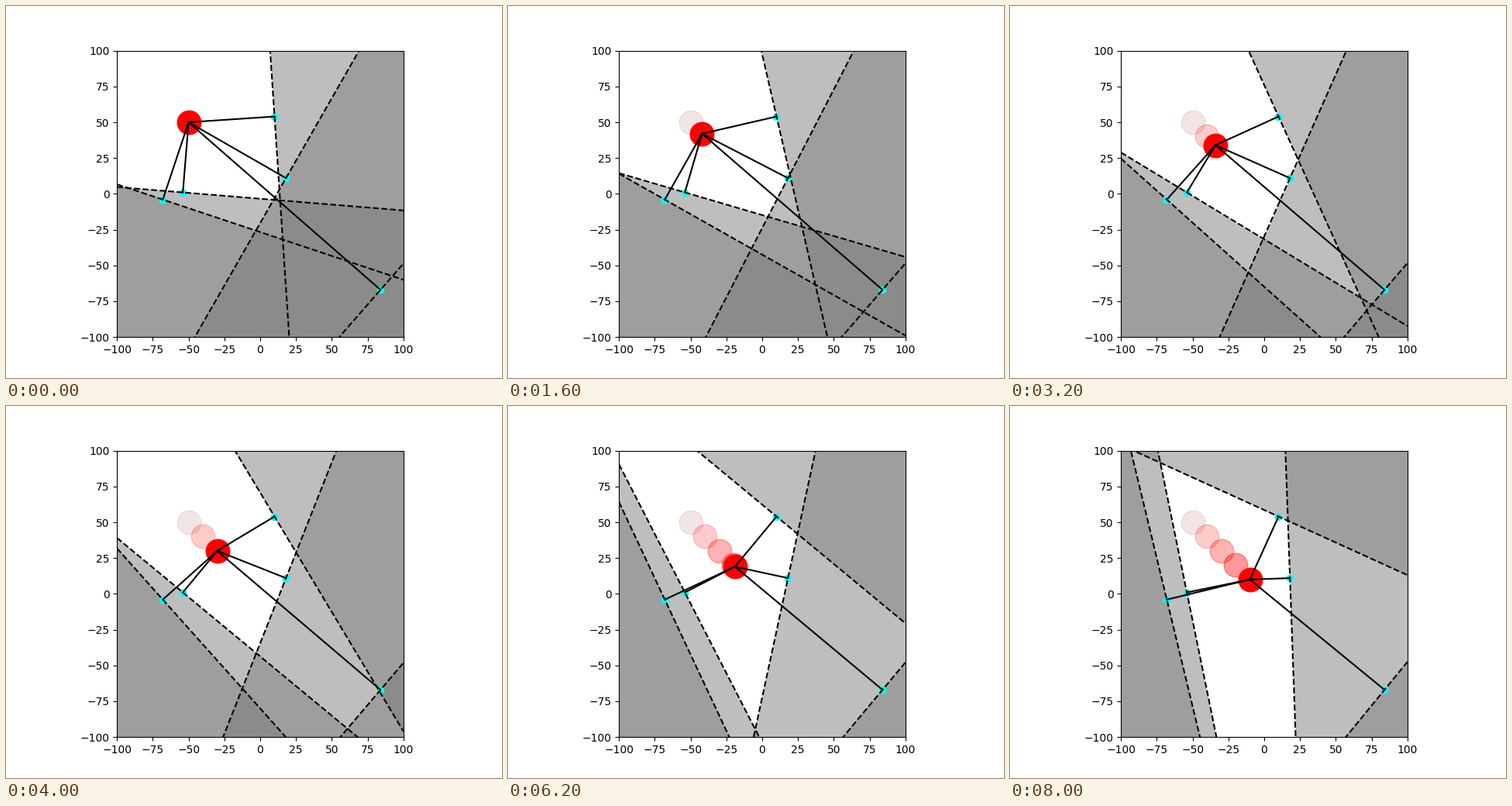
A matplotlib script that plays this animation: 640 by 480 pixels, repeating every 8.2 s.

```python
from itertools import combinations

import matplotlib.pyplot as plt
import numpy as np
from matplotlib.animation import FuncAnimation
from matplotlib.patches import Polygon

FRAMES = 41
INTERVAL = 200
LIMIT = 100
START = np.array([-50.0, 50.0])
STEP = np.array([1.0, -1.0])
POINTS = np.array([(-54, 1), (-68, -4), (10, 54), (18, 11), (84, -67)], float)
SHADES = {1: "#bebebe", 2: "#9e9e9e", 3: "#8b8b8b"}
TRAIL_EVERY = 10
TRAIL_COLORS = [(0.6, 0, 0)] + ["red"] * 3
BODY_SIZE = 22
SQUARE = [np.array(c, float) * LIMIT for c in ((-1, -1), (1, -1), (1, 1), (-1, 1))]


def clip(poly, point, normal):
    """Keep the part of a convex polygon lying beyond point along normal."""
    kept = []
    for a, b in zip(poly, poly[1:] + poly[:1]):
        da, db = (a - point) @ normal, (b - point) @ normal
        if da >= 0:
            kept.append(a)
        if da * db < 0:
            kept.append(a + (b - a) * da / (da - db))
    return kept


def barrier(point, normal):
    """Line through point at right angles to normal, across the x range."""
    slope = -normal[0] / (normal[1] or 1e-3)
    x = np.array([-LIMIT, LIMIT])
    return x, point[1] + slope * (x - point[0])


fig, ax = plt.subplots(figsize=(6.4, 4.8), dpi=100)
ax.set_aspect("equal")
ax.set_xlim(-LIMIT, LIMIT)
ax.set_ylim(-LIMIT, LIMIT)

# Overlaps of one, two and three half-planes, darker with each level
shadows = []
for depth, shade in SHADES.items():
    for combo in combinations(range(len(POINTS)), depth):
        patch = Polygon(np.zeros((3, 2)), facecolor=shade, linewidth=0)
        shadows.append((combo, ax.add_patch(patch)))

trail = []
for i, color in enumerate(TRAIL_COLORS):
    x, y = START + STEP * TRAIL_EVERY * i
    trail += ax.plot(x, y, "o", color=color, ms=BODY_SIZE, alpha=0.1 * (i + 1))

body, = ax.plot([], [], "o", color="red", ms=BODY_SIZE)
ax.plot(*POINTS.T, "o", color="cyan", ms=6)
rays = [ax.plot([], [], "k-", lw=1.5)[0] for _ in POINTS]
walls = [ax.plot([], [], "k--", lw=1.5)[0] for _ in POINTS]


def update(k):
    pos = START + STEP * k
    normals = POINTS - pos
    body.set_data([pos[0]], [pos[1]])

    for i, ghost in enumerate(trail):
        ghost.set_visible(k > i * TRAIL_EVERY)

    for ray, wall, point, normal in zip(rays, walls, POINTS, normals):
        ray.set_data([pos[0], point[0]], [pos[1], point[1]])
        wall.set_data(*barrier(point, normal))

    for combo, patch in shadows:
        poly = SQUARE
        for i in combo:
            poly = clip(poly, POINTS[i], normals[i])
        patch.set_visible(len(poly) > 2)
        if len(poly) > 2:
            patch.set_xy(poly)

    return [body, *trail, *rays, *walls, *(patch for _, patch in shadows)]


anim = FuncAnimation(fig, update, frames=FRAMES, interval=INTERVAL, repeat=True)
plt.show()
```
